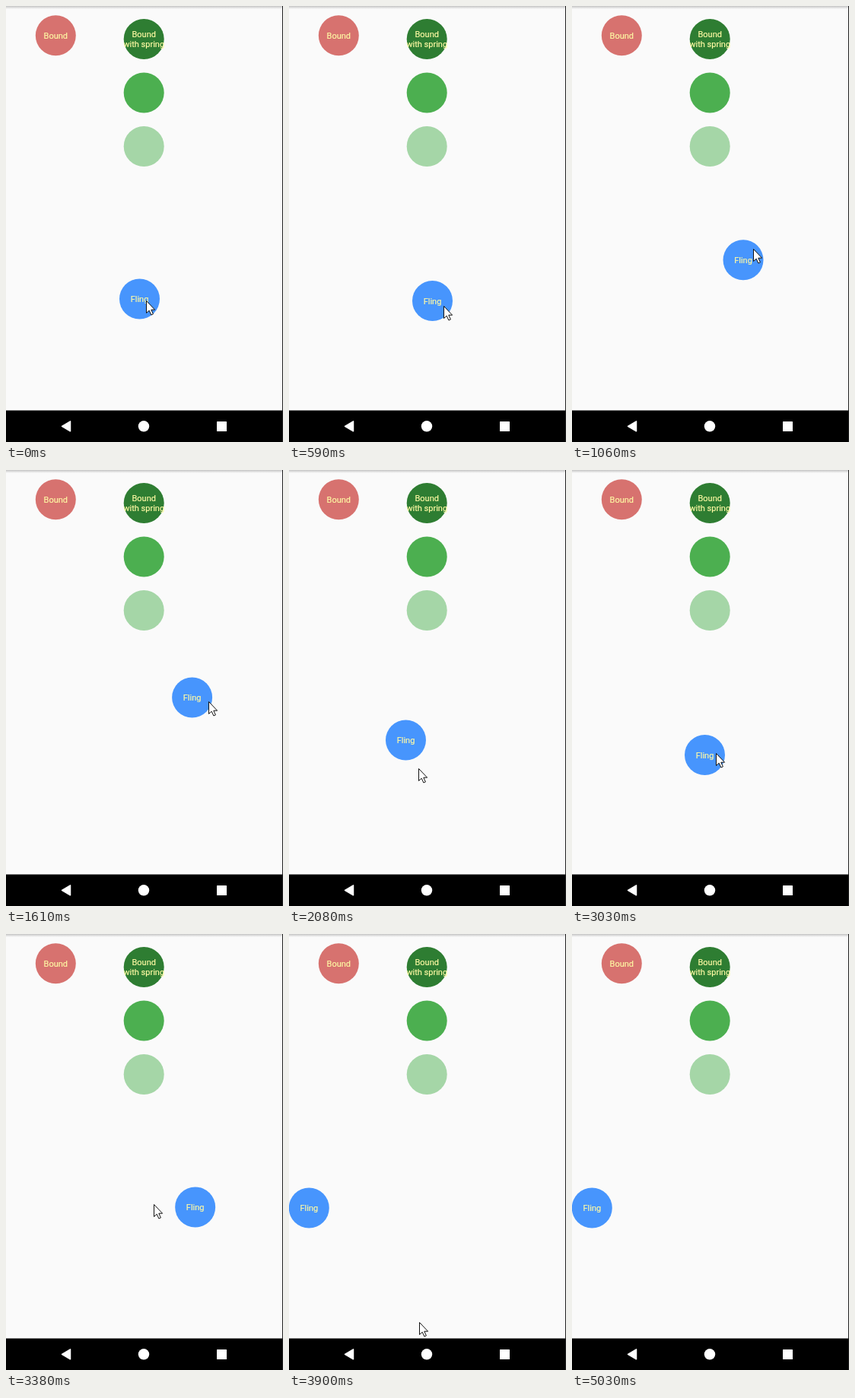
These frames come from a looping animation (364 by 573 pixels, 5.53 s). An HTML page:

```html
<!DOCTYPE html>
<html lang="en">
<head>
<meta charset="utf-8">
<title>Fling</title>
<style>
  html, body { margin: 0; width: 100%; height: 100%; overflow: hidden; background: #fafafa; }
  svg { display: block; }
  text { font: 11px Roboto, sans-serif; fill: #fffaa4; stroke: #fffaa4; stroke-width: .2; text-anchor: middle; }
</style>
</head>
<body>
<svg width="364" height="573" viewBox="0 0 364 573">
  <defs>
    <linearGradient id="shade" x2="0" y2="1">
      <stop stop-color="#c4c4c4"/>
      <stop offset="1" stop-color="#fafafa"/>
    </linearGradient>
    <clipPath id="label"><path d="M154.5 17h53.5v53h-53.5z"/></clipPath>
  </defs>
  <rect width="364" height="573" fill="#fafafa"/>
  <rect width="364" height="4" fill="url(#shade)"/>

  <circle cx="65.3" cy="38.8" r="26.5" fill="#d7726f"/>
  <text x="65.3" y="43">Bound</text>
  <circle cx="181.2" cy="43.5" r="26.5" fill="#2e7d32"/>
  <g clip-path="url(#label)">
    <text x="181.2" y="41.3">Bound</text>
    <text x="181.2" y="54.2">with spring</text>
  </g>
  <circle cx="181.2" cy="114" r="26.5" fill="#4caf50"/>
  <circle cx="181.2" cy="184.5" r="26.5" fill="#a5d6a7"/>

  <g id="ball">
    <circle r="26.5" fill="#4795fd"/>
    <text y="4.2">Fling</text>
  </g>

  <rect y="531.5" width="364" height="41.5"/>
  <g fill="#fff">
    <path d="M73.5 552.3 84.5 545.8V558.8Z" stroke="#fff" stroke-width="1.5" stroke-linejoin="round"/>
    <circle cx="181" cy="552.3" r="7.2"/>
    <rect x="277" y="546" width="13" height="13" rx=".5"/>
  </g>
  <rect x="363" width="1" height="573" fill="#222"/>

  <path id="pointer" d="M.5 .5V16.5L4.2 13.2 6.9 19 9.4 17.9 6.8 12.2H11.6Z" fill="#fff" stroke="#111"/>
</svg>
<script>
const LOOP = 5530;

const drag = p => p * p * (3 - 2 * p);
const fling = p => 1 - (1 - p) ** 2.4;

// Each move: start ms, end ms, destination x, y, easing.
const actors = [
  { id: "pointer", x: 184, y: 387, moves: [
    [60, 590, 203, 394, drag],
    [770, 1230, 254, 286, drag],
    [1380, 1600, 266, 304, drag],
    [1600, 1910, 182, 349, drag],
    [1970, 2160, 163, 418, drag],
    [2160, 2430, 150, 392, drag],
    [2530, 2620, 144, 387, drag],
    [2620, 2760, 143, 400, drag],
    [2760, 3030, 189, 372, drag],
    [3090, 3290, 264, 358, drag],
    [3290, 3380, 195, 354, drag],
    [3380, 3610, 83, 417, fling],
    [3670, 3900, 171, 510, drag],
    [4150, 4390, 108, 370, drag],
    [4390, 4680, 213, 552, drag],
    [4730, 5030, 294, 574, drag]
  ] },
  { id: "ball", x: 175.5, y: 385, moves: [
    [60, 590, 188.5, 387.5, drag],
    [910, 1280, 239.5, 312.5, fling],
    [1380, 1600, 251.5, 295.5, drag],
    [1600, 1910, 168.5, 336.5, fling],
    [1970, 2430, 137.5, 374.5, fling],
    [2530, 2620, 132.5, 381, drag],
    [2620, 2800, 130.5, 393, drag],
    [2800, 3030, 174.5, 374.5, drag],
    [3090, 3380, 251, 359, drag],
    [3380, 3610, 26.3, 360, fling]
  ] }
];

function place({ id, x, y, moves }, t) {
  for (const [start, end, toX, toY, ease] of moves) {
    if (t <= start) break;
    const k = ease(Math.min(1, (t - start) / (end - start)));
    x += (toX - x) * k;
    y += (toY - y) * k;
  }
  if (id === "pointer") [x, y] = [Math.round(x), Math.round(y)];
  document.getElementById(id).setAttribute("transform", `translate(${x} ${y})`);
}

function draw() {
  const t = performance.now() % LOOP;
  for (const actor of actors) place(actor, t);
  requestAnimationFrame(draw);
}
draw();
</script>
</body>
</html>
```
